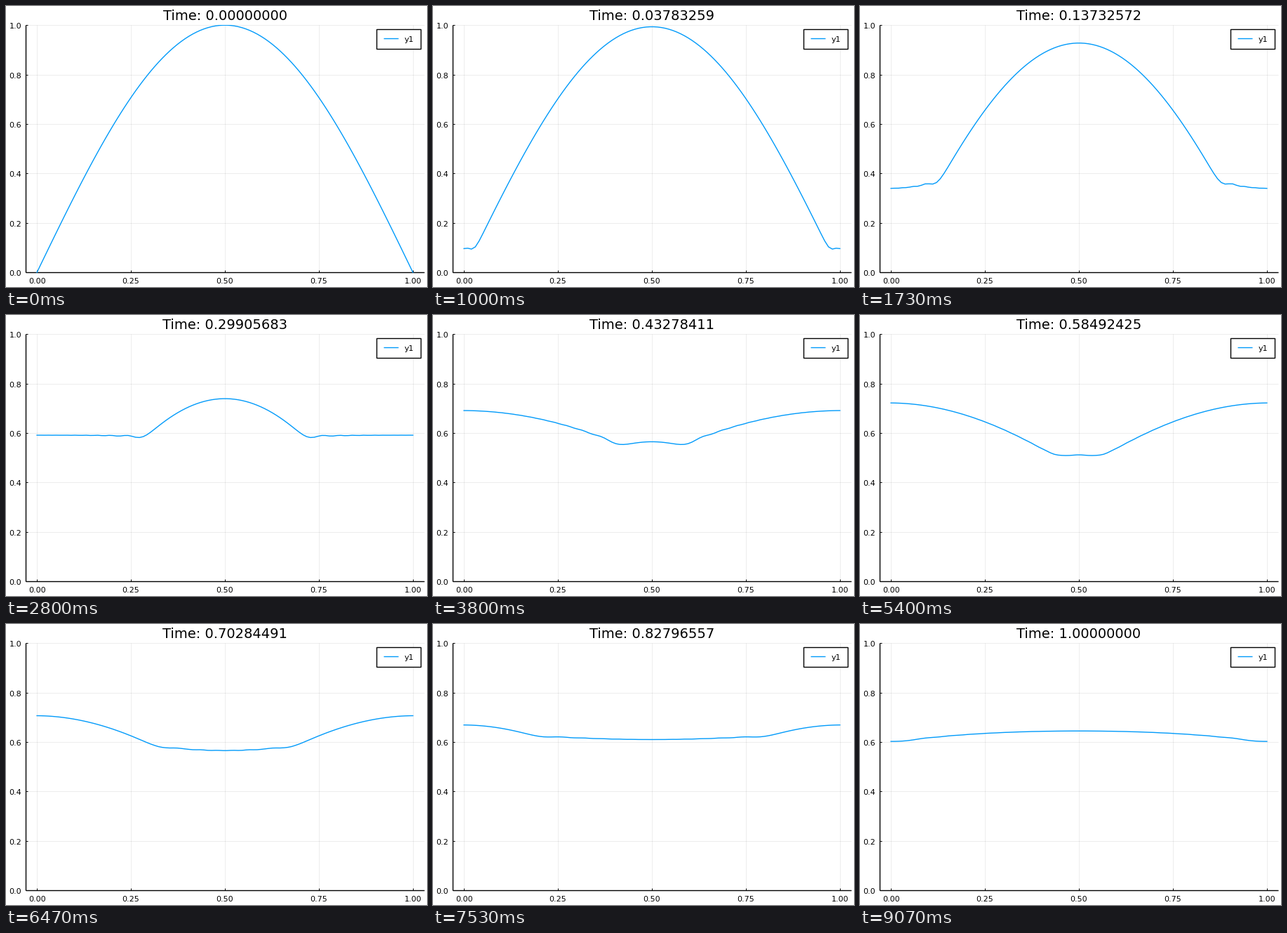
Animation of 600x400 px, one loop 9.14 s. Source, as a matplotlib script:

```python
import numpy as np
import matplotlib.pyplot as plt
from matplotlib.animation import FuncAnimation
from matplotlib.patches import Rectangle

plt.rcParams["font.family"] = "DejaVu Sans"

W, H = 600, 400
LEFT, RIGHT, TOP, BOTTOM = 28, 596, 27.25, 379.25
LOOP, TICK = 9140, 20      # ms
STATES = 137
BLUE = "#009afa"

# Damped wave u_tt + a u_t = u_xx on a closed grid, solved mode by mode
N = 100
DX = 1 / (N - 2)
DAMP = 5.0
x = np.linspace(0, 1, N)
start = np.sin(np.pi * x)
modes = np.arange(N)
basis = np.cos(np.pi * np.outer(np.arange(N) + 0.5, modes) / N)
coef = 2 / N * basis.T @ start
coef[0] /= 2
omega = 2 / DX * np.sin(np.pi * modes / (2 * N))
freq = np.sqrt((omega ** 2 - DAMP ** 2 / 4).astype(complex))

# Solver time at a few states, with the step size there
KNOTS = [0, 14, 26, 42, 57, 81, 113, 136]
TIMES = [0, 0.03094217, 0.13732572, 0.29905683, 0.43278411,
         0.58492425, 0.82796557, 1.0]
STEPS = [0.0001, 0.0066, 0.0098, 0.0098, 0.0075, 0.0068, 0.0077, 0.0075]


def solver_time(i):
    k = min(np.searchsorted(KNOTS, i, side="right") - 1, len(KNOTS) - 2)
    h = KNOTS[k + 1] - KNOTS[k]
    s = (i - KNOTS[k]) / h
    blend = s * s * (3 - 2 * s)
    return (TIMES[k] * (1 - blend) + TIMES[k + 1] * blend
            + h * s * (1 - s) * (STEPS[k] * (1 - s) - STEPS[k + 1] * s))


def wave(t):
    if t == 0:
        return start
    swing = np.cos(freq * t) + DAMP / 2 * np.sin(freq * t) / freq
    return basis @ (coef * np.exp(-DAMP * t / 2) * swing.real)


def px(v):
    return LEFT + (np.asarray(v) + 0.03) / 1.06 * (RIGHT - LEFT)


def py(v):
    return BOTTOM - np.asarray(v) * (BOTTOM - TOP)


fig = plt.figure(figsize=(W / 100, H / 100), dpi=100, facecolor="white")
ax = fig.add_axes([0, 0, 1, 1])
ax.set_xlim(0, W)
ax.set_ylim(H, 0)
ax.axis("off")


def segment(x0, y0, x1, y1, width=1.0, **style):
    ax.plot([x0, x1], [y0, y1], lw=width, solid_capstyle="butt",
            **{"color": "black", **style})


def label(tx, ty, text, size=8, ha="center"):
    return ax.text(tx, ty, text, size=size, ha=ha, va="baseline")


for v in np.linspace(0, 1, 5):
    cx = float(px(v))
    segment(cx, TOP, cx, BOTTOM, 0.5, alpha=0.1, zorder=1)
    segment(cx, BOTTOM, cx, BOTTOM - 3, 0.7)
    label(cx, 395, f"{v:.2f}")

for v in np.linspace(0, 1, 6):
    cy = float(py(v))
    segment(LEFT, cy, RIGHT, cy, 0.5, alpha=0.1, zorder=1)
    segment(LEFT, cy, LEFT + 3, cy, 0.7)
    label(22, cy + 5, f"{v:.1f}", ha="right")

segment(LEFT, TOP, LEFT, BOTTOM)
segment(LEFT, BOTTOM, RIGHT, BOTTOM)

curve, = ax.plot(px(x), py(start), color=BLUE, lw=1, zorder=3)
curve.set_clip_path(Rectangle((LEFT, TOP - 0.5), RIGHT - LEFT,
                              BOTTOM - TOP + 1, transform=ax.transData))

ax.add_patch(Rectangle((528, 33), 63, 28, fc="white", ec="black",
                       lw=1, zorder=4))
segment(538, 46, 559, 46, color=BLUE, zorder=5)
label(567.7, 51, "y1", ha="left").set_zorder(5)

title = label(312, 20, "", size=14)


def update(n):
    ms = n * TICK + TICK / 2
    t = solver_time(min(int((ms + 5) * 15 / 1000), STATES - 1))
    curve.set_ydata(py(wave(t)))
    title.set_text(f"Time: {t:.8f}")
    return curve, title


anim = FuncAnimation(fig, update, frames=LOOP // TICK, interval=TICK,
                     repeat=True, repeat_delay=0)
plt.show()
```
